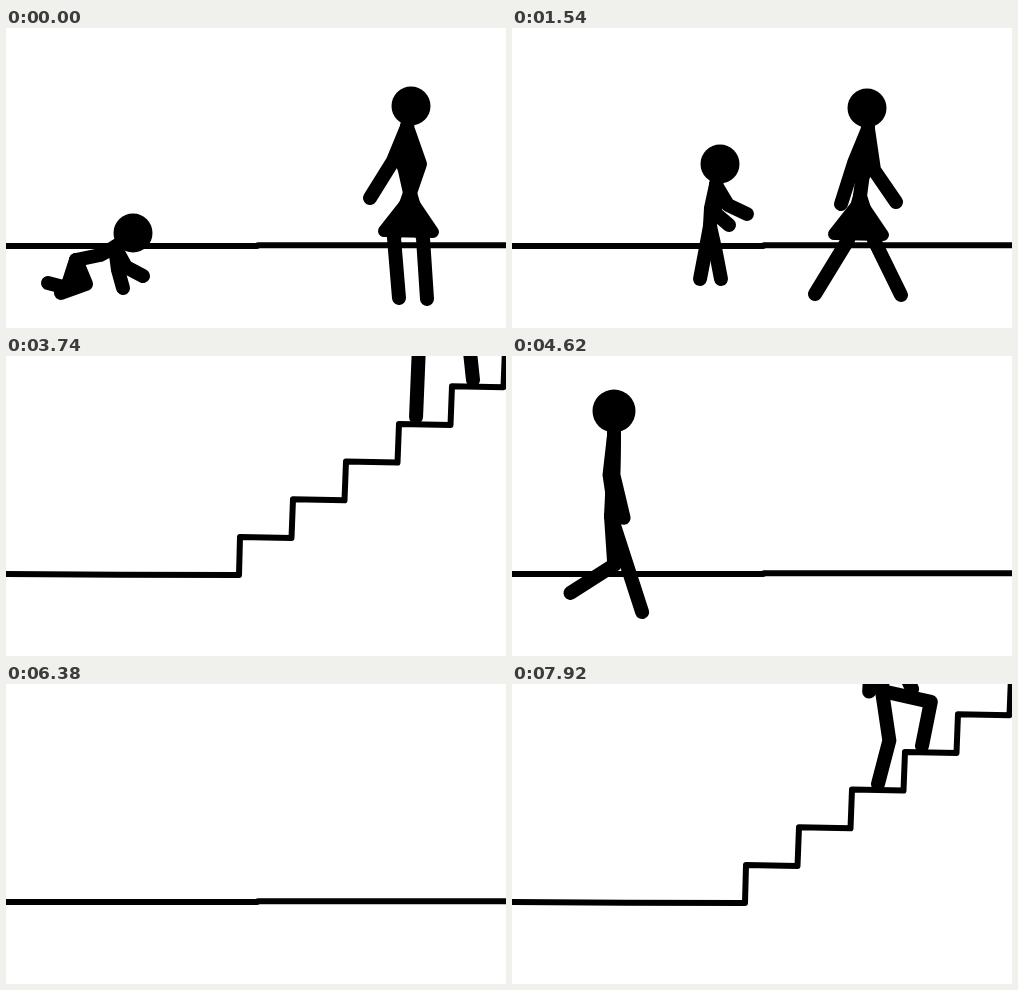
Recreate the animation shown at these times as an HTML page with a canvas. Size 500 by 300 pixels, loop 8000 ms.

```html
<!DOCTYPE html>
<html lang="en">
<head>
<meta charset="utf-8">
<title>Stick figures growing up</title>
<style>
  html, body { margin: 0; width: 100%; height: 100%; overflow: hidden; background: #fff; }
  canvas { display: block; width: 100vw; height: 100vh; }
</style>
</head>
<body>
<canvas id="stage" width="500" height="300"></canvas>
<script>
const ctx = document.getElementById('stage').getContext('2d');
const { PI, sin, cos, min, max, abs, hypot, floor } = Math;
const LOOP = 8000, STEP = 110;

const clamp = v => max(0, min(1, v));
const mix = (a, b, k) => a + (b - a) * k;
const mixPoint = (p, q, k) => [mix(p[0], q[0], k), mix(p[1], q[1], k)];
const shift = ([x, y], dx, dy = 0) => [x + dx, y + dy];
const swing = ([x, y], length, angle) => [x + length * sin(angle), y + length * cos(angle)];

function mixPose(a, b, k) {
  return Object.fromEntries(Object.keys(a).map(part =>
    [part, a[part].map((p, n) => mixPoint(p, b[part][n], k))]));
}
function movePose(pose, dx) {
  return Object.fromEntries(Object.entries(pose).map(([part, points]) =>
    [part, points.map(p => shift(p, dx))]));
}

// Value of a piecewise linear track of [step, value] keys
function track(keys, i) {
  const n = keys.findIndex(key => key[0] > i);
  if (n < 0) return keys[keys.length - 1][1];
  const [[i0, v0], [i1, v1]] = [keys[n - 1], keys[n]];
  return mix(v0, v1, (i - i0) / (i1 - i0));
}

function trace(points) {
  ctx.beginPath();
  points.forEach(([x, y]) => ctx.lineTo(x, y));
}
function line(points, width) {
  trace(points);
  ctx.lineWidth = width;
  ctx.stroke();
}

// spine runs head, neck, middle, hip
function drawFigure({ spine, legA, legB, armA, armB }, radius) {
  const [head, neck, , hip] = spine;
  line(spine, 14);
  line([hip, ...legA], 14);
  line([hip, ...legB], 14);
  line([neck, ...armA], 14);
  line([neck, ...armB], 14);
  ctx.beginPath();
  ctx.arc(head[0], head[1], radius, 0, 2 * PI);
  ctx.fill();
}

const crawl = {
  spine: [[127, 205], [109, 219], [94, 227], [70, 232]],
  legA: [[80, 256], [55, 265]], legB: [[61, 260], [42, 255]],
  armA: [[112, 242], [117, 260]], armB: [[120, 239], [137, 248]]
};
const toddle = {
  spine: [[208, 136], [204, 157], [199, 180], [198, 198]],
  legA: [[193, 225], [188, 251]], legB: [[204, 225], [209, 251]],
  armA: [[216, 177], [235, 186]], armB: [[203, 185], [217, 197]]
};
const wave = {
  spine: [[208, 124], [208, 147], [208, 172], [208, 195]],
  legA: [[208, 225], [207, 254]], legB: [[203, 220], [178, 243]],
  armA: [[234, 147], [254, 143]], armB: [[199, 128], [207, 103]]
};
const womanStand = {
  spine: [[405, 78], [401, 99], [398, 138], [404, 165]],
  legA: [[388, 210], [393, 270]], legB: [[417, 210], [421, 271]],
  armA: [[387, 133], [364, 170]], armB: [[414, 136], [404, 165]]
};
const womanStride = {
  spine: [[355, 80], [356, 101], [352, 138], [348, 168]],
  legA: [[336, 212], [303, 266]], legB: [[362, 212], [389, 267]],
  armA: [[342, 135], [329, 176]], armB: [[362, 142], [384, 174]]
};
const womanPath = [[0, 404], [8, 390], [12, 342], [14, 348], [16, 366], [23, 560]];

function childPose(i) {
  if (i <= 13) {
    const { legA, legB, armA, armB } = crawl;
    const swapped = { ...crawl, legA: legB, legB: legA, armA: armB, armB: armA };
    const crawling = mixPose(crawl, swapped, (1 - cos(PI * min(i, 8) / 2)) / 2);
    return mixPose(movePose(crawling, 14.4 * min(i, 8)), toddle, clamp((i - 8) / 5));
  }
  const pose = mixPose(toddle, wave, clamp((i - 16) / 4));
  if (i > 20) pose.armB[1] = shift(pose.armB[1], 6 * sin((i - 22) * PI / 2));
  return pose;
}

function drawWoman(i) {
  const stride = min(1, i / 8) * abs(cos(PI * (i - 14) / 3));
  const pose = mixPose(movePose(womanStand, -404), movePose(womanStride, -348), stride);
  const placed = movePose(pose, track(womanPath, i));
  const { spine: [, neck, , hip], armA, armB } = placed;
  drawFigure(placed, 19.5);
  trace([neck, armA[0], hip, armB[0]]);
  ctx.fill();
  const skirt = [shift(hip, 0, 5), shift(hip, -26, 38), shift(hip, 23, 39)];
  trace(skirt);
  ctx.closePath();
  ctx.lineWidth = 12;
  ctx.stroke();
  ctx.fill();
}

function drawAdult(hip, armSwing, legA, legB) {
  const neck = shift(hip, 3, -80);
  const arm = s => {
    const elbow = swing(neck, 39, -.065 + .28 * s);
    return [elbow, swing(elbow, 44, .19 + .25 * s)];
  };
  drawFigure({
    spine: [shift(hip, 3, -105), neck, shift(hip, 2, -40), hip],
    legA, legB, armA: arm(-armSwing), armB: arm(armSwing)
  }, 21.5);
}

function drawWalker(i) {
  const hip = [309 + 30 * (i - 49), 160];
  const phase = .87 + (i - 49) * PI / 3;
  const leg = p => {
    const thigh = .19 + .7 * sin(p);
    const knee = swing(hip, 49, thigh);
    return [knee, swing(knee, 52, thigh - 1.37 * max(0, cos(p - .5)))];
  };
  drawAdult(hip, sin(phase), leg(phase + PI), leg(phase));
}

// Places where the feet land, tread by tread; below 1 they are on the floor
const footX = k => ({ 3: 366, 4: 410 })[k] ?? 207 + 52 * k;
const foothold = k => [footX(k), min(210, 214 - 38 * k)];

function bentLeg(hip, foot) {
  const thigh = 50, shin = 45;
  const dx = foot[0] - hip[0], dy = foot[1] - hip[1];
  const d = hypot(dx, dy), reach = min(d, thigh + shin);
  const along = (thigh ** 2 - shin ** 2 + reach ** 2) / (2 * reach);
  const out = Math.sqrt(max(0, thigh ** 2 - along ** 2));
  const [ux, uy] = [dx / d, dy / d];
  return [
    [hip[0] + ux * along + uy * out, hip[1] + uy * along - ux * out],
    [hip[0] + ux * reach, hip[1] + uy * reach]
  ];
}

function drawClimber(steps) {
  const n = floor(steps), f = steps - n;
  const hip = [mix(footX(n), footX(n + 1), f) + 4, min(118, 130 - 41 * steps)];
  const moving = shift(mixPoint(foothold(n), foothold(n + 2), f), 0, -16 * sin(PI * f));
  drawAdult(hip, cos(PI * steps), bentLeg(hip, moving), bentLeg(hip, foothold(n + 1)));
}

function drawFloor(dx = 0) {
  line([[dx - 4, 218], [dx + 251, 218]], 6);
  line([[dx + 252, 217.3], [520, 217.3]], 6);
}

function drawStairs() {
  const points = [[-5, 218], [114, 218.7], [233, 219]];
  for (let k = 0; k < 6; k++) {
    const x = 234 + 53 * k, y = 181 - 37.7 * k;
    points.push([x, y], [x + 51.5, y + 1]);
  }
  line(points, 6);
}

function draw(i) {
  ctx.fillStyle = '#fff';
  ctx.fillRect(0, 0, 500, 300);
  ctx.fillStyle = ctx.strokeStyle = '#000';
  ctx.lineCap = ctx.lineJoin = 'round';

  if (i < 25) {
    drawFloor(i < 21 ? 0 : 10);
    drawFigure(childPose(i), 19.5);
    if (i < 23) drawWoman(i);
  } else if (i < 38) {
    drawStairs();
    if (i < 36) drawClimber(4 + (i - 34) / 2);
  } else if (i < 59) {
    drawFloor();
    drawWalker(i);
  } else {
    drawStairs();
    drawClimber(3 + (i - 72) / 2);
  }
}

function tick(now) {
  draw(floor((now - start) % LOOP / STEP));
  requestAnimationFrame(tick);
}
const start = performance.now();
draw(0);
requestAnimationFrame(now => tick(max(now, start)));
</script>
</body>
</html>
```
